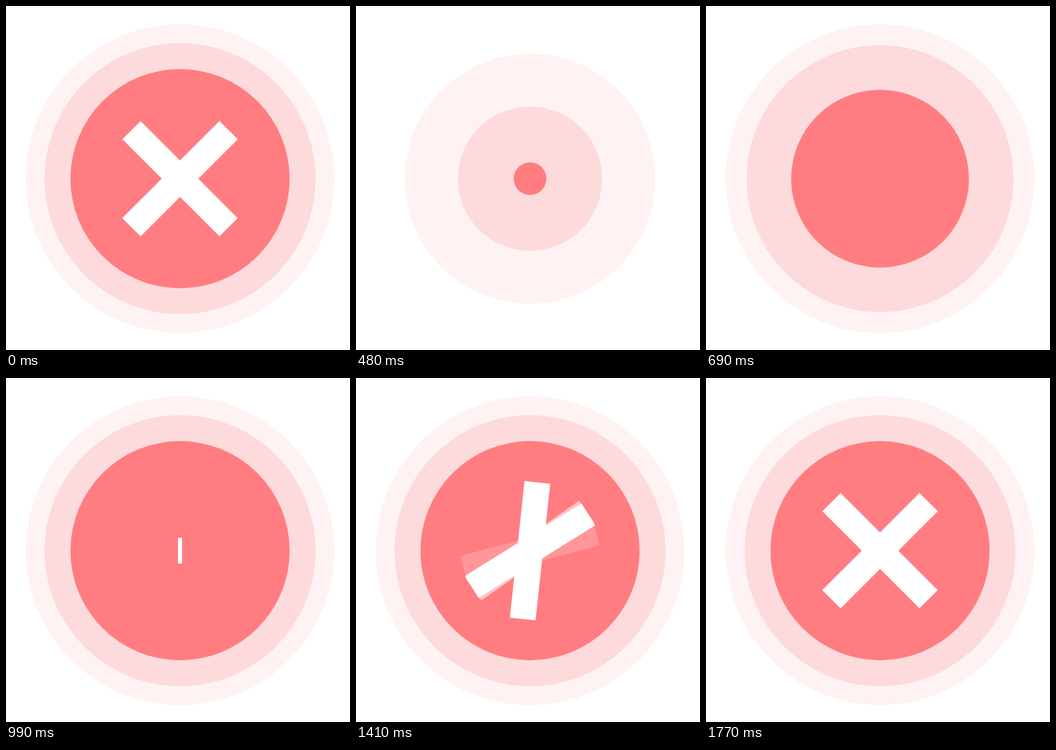
An HTML page with a canvas that plays this animation: 506 px wide and 506 px high, repeating every 2.25 s.

```html
<!DOCTYPE html>
<html lang="en">
<head>
<meta charset="utf-8">
<title>Error badge</title>
<style>
  html, body { margin: 0; width: 100%; height: 100%; overflow: hidden; background: #fff; }
  canvas { display: block; width: 506px; height: 506px; }
</style>
</head>
<body>
<canvas id="stage" width="506" height="506"></canvas>
<script>
  const ctx = document.getElementById('stage').getContext('2d');
  const LOOP = 2250, STEP = 30, BLANK = 120, DONE = 1770;
  const CX = 256, CY = 254;
  const BAR = { length: 202, width: 38, start: 955, time: 280 };
  const DISC_TIME = 525, TURN_TIME = 446;

  const discs = [
    { color: '#fff2f2', radius: 227, start: 129 },
    { color: '#fddadc', radius: 199.3, start: 219 },
    { color: '#ff7d80', radius: 161.2, start: 339 }
  ];

  // Back to front: two fading trails, then the two solid strokes.
  const bars = [
    { turn: -225, start: 1327, alpha: 0.2 },
    { turn: -225, start: 1288, alpha: 0.55 },
    { turn: -135, start: 1262, alpha: 1 },
    { turn: -225, start: 1226, alpha: 1 }
  ];

  // Cubic bezier (0.447, 0, 0.5, 1), solved by bisection.
  function ease(x) {
    if (x <= 0) return 0;
    if (x >= 1) return 1;
    let lo = 0, hi = 1;
    for (let i = 0; i < 24; i++) {
      const s = (lo + hi) / 2, r = 1 - s;
      const bx = 3 * 0.447 * s * r * r + 3 * 0.5 * s * s * r + s * s * s;
      if (bx < x) lo = s; else hi = s;
    }
    return lo * lo * (3 - 2 * lo);
  }

  const progress = (t, start, time) => ease((t - start) / time);

  function drawDisc(disc, t) {
    const radius = disc.radius * progress(t, disc.start, DISC_TIME);
    if (radius <= 0) return;
    ctx.fillStyle = disc.color;
    ctx.beginPath();
    ctx.arc(CX, CY, radius, 0, Math.PI * 2);
    ctx.fill();
  }

  function drawBar(bar, t) {
    const length = BAR.length * progress(t, BAR.start, BAR.time);
    if (length <= 0) return;
    ctx.save();
    ctx.translate(CX, CY);
    ctx.rotate(bar.turn * progress(t, bar.start, TURN_TIME) * Math.PI / 180);
    ctx.globalAlpha = bar.alpha;
    ctx.fillStyle = '#fff';
    ctx.fillRect(-length / 2, -BAR.width / 2, length, BAR.width);
    ctx.restore();
  }

  function draw(now) {
    let t = Math.floor((now % LOOP) / STEP) * STEP;
    if (t < BLANK || t >= DONE) t = LOOP;
    ctx.fillStyle = '#fff';
    ctx.fillRect(0, 0, 506, 506);
    discs.forEach(disc => drawDisc(disc, t));
    bars.forEach(bar => drawBar(bar, t));
  }

  let origin = null;
  function tick(now) {
    if (origin === null) origin = now;
    draw(now - origin);
    requestAnimationFrame(tick);
  }

  draw(0);
  requestAnimationFrame(tick);
</script>
</body>
</html>
```
